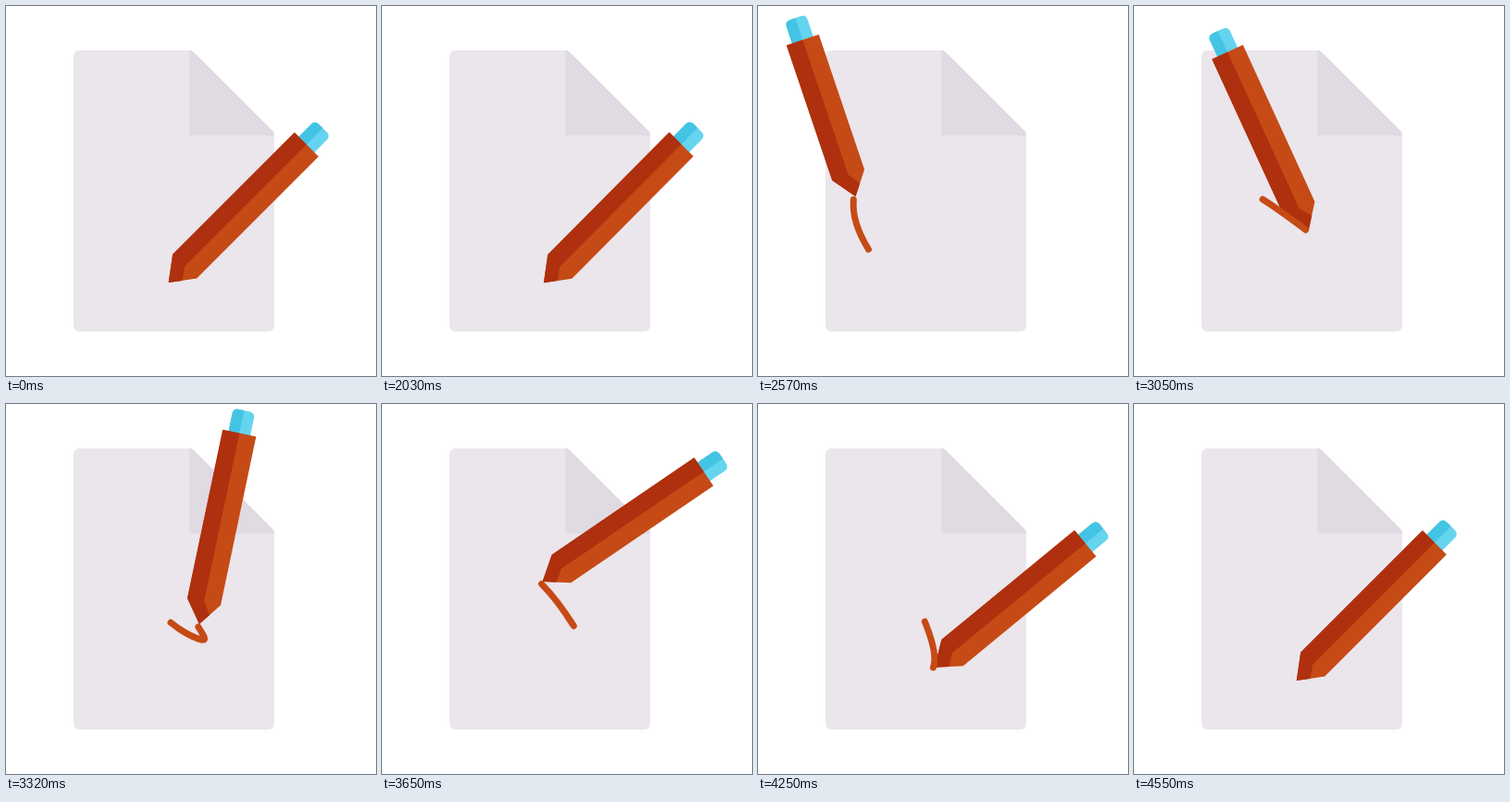
Recreate the animation shown at these times as an HTML page. Size 400 by 400 pixels, loop 4580 ms.

```html
<!DOCTYPE html>
<html lang="en">
<head>
<meta charset="utf-8">
<title>Pencil and paper</title>
<style>
  html, body { margin: 0; width: 100%; height: 100%; overflow: hidden; background: #fff; }
  svg { display: block; width: 100%; height: 100%; }
</style>
</head>
<body>
<svg viewBox="0 0 400 400">
  <path fill="#ebe6ec" d="M80 48H199Q201.5 48 203.5 50.5L288 135Q290 137 290 139.5V345Q290 352 283 352H80Q73 352 73 345V55Q73 48 80 48Z"/>
  <path fill="#e0dae3" d="M198 48H199Q201.5 48 203.5 50.5L288 135Q290 137 290 139.5V140H201Q198 140 198 137Z"/>
  <g id="pencil">
    <g id="cap">
      <path fill="#64d4ef" d="M-1 -12H19Q25 -12 25 -6V6Q25 12 19 12H-1Z"/>
      <path fill="#44c4e4" d="M-1 -12H19Q25 -12 25 -6V0H-1Z"/>
    </g>
    <path id="body" fill="#c64a15"/>
    <path id="shade" fill="#ae300e"/>
  </g>
  <path id="line" fill="none" stroke="#c64a15" stroke-width="7" stroke-linecap="round"/>
</svg>
<script>
  const LOOP = 4580, BEGIN = 2000, END = 4550, STEP = 30;
  const BODY = 211, DASH = 57, LAG = 2;

  const $ = id => document.getElementById(id);
  const line = $('line');
  const linear = u => u;

  // The scribble, leg by leg: end time, curve, easing
  const legs = [
    [2570, 'C162 303 148 302 138 289C132 281 126 273 120 264C110 248 101 228 103.5 207.5', u => u ** 1.7],
    [3050, 'C105 196 112 194 120 198C126 201 132 204.5 139 209C155 219 171 231 187 243', linear],
    [3650, 'C196 249 204 253 212 255C218 256 213 249 206 238C196 222 184 206 171.5 193.5', linear],
    [4010, 'C169.5 190 165.5 190 166.5 196C170 210 176 224 182 239.5', linear],
    [END, 'C190 260 194 278 188 288C184 295 180 298 173.7 300.5', u => 1 - (1 - u) ** 2]
  ];

  let d = 'M173.7 300.5', time = BEGIN, length = 0;
  const spans = legs.map(([end, curve, ease]) => {
    line.setAttribute('d', d += curve);
    const span = { start: time, end, ease, from: length, to: line.getTotalLength() };
    time = end;
    length = span.to;
    return span;
  });

  const part = (t, a, b) => Math.min(1, Math.max(0, (t - a) / (b - a)));

  function swing(t, a, b) {
    const u = part(t, a, b) ** 1.87, v = (1 - part(t, a, b)) ** 1.87;
    return u / (u + v);
  }

  const heading = t =>
    135 - 77 * swing(t, BEGIN, 2817) + 93 * swing(t, 2840, 3830) - 16 * swing(t, 3830, END);

  // The shaft shortens for a moment at the top left
  const squash = t => 45 * Math.sin(Math.PI * part(t, 2390, 2950)) ** 2;

  function travelled(t) {
    const s = spans.find(s => t < s.end);
    return s ? s.from + (s.to - s.from) * s.ease(part(t, s.start, s.end)) : length;
  }

  function draw(t) {
    const dist = travelled(t), p = line.getPointAtLength(dist), top = BODY - squash(t);
    $('pencil').setAttribute('transform',
      `translate(${p.x + 2} ${p.y - 1.5}) rotate(${heading(t) + 180})`);
    $('cap').setAttribute('transform', `translate(${top})`);
    $('body').setAttribute('d', `M0 0L24.7 -18.4H${top}V18.4H24.7Z`);
    $('shade').setAttribute('d', `M0 0L24.7 -18.4H${top}V0H24.7L12 9Z`);

    const head = dist - LAG;
    const len = Math.min(DASH, head) * (1 - part(t, 4220, 4520));
    line.style.visibility = len > 0 ? 'visible' : 'hidden';
    line.setAttribute('stroke-dasharray', `${Math.max(len, 0)} ${2 * length}`);
    line.setAttribute('stroke-dashoffset', len - head);
  }

  const t0 = performance.now();
  function tick() {
    const t = (performance.now() - t0) % LOOP, rest = BEGIN + STEP;
    draw(t < rest ? 0 : rest + Math.floor((t - rest) / STEP) * STEP);
    requestAnimationFrame(tick);
  }
  tick();
</script>
</body>
</html>
```
